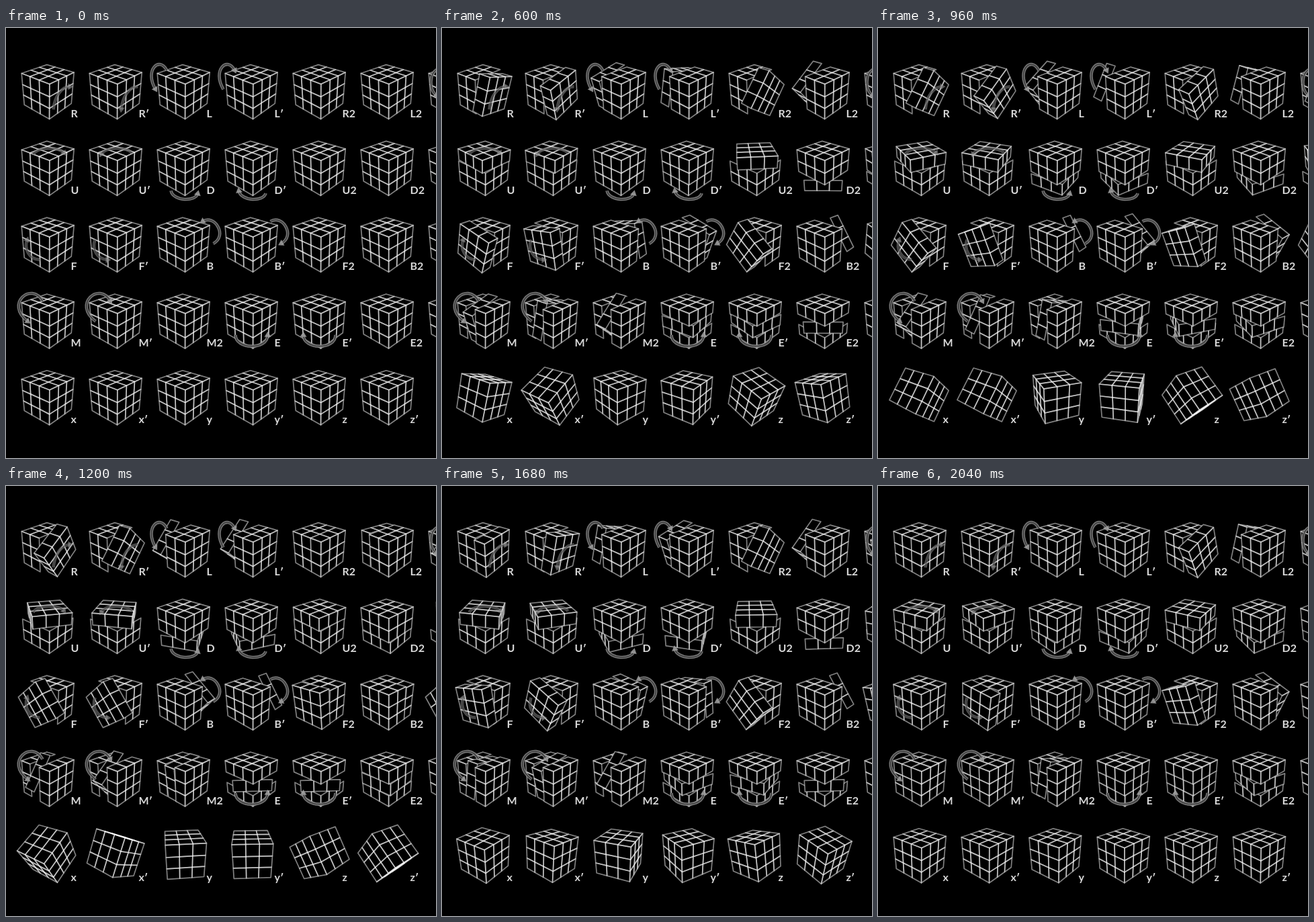
An HTML page with a canvas for the animation above (2160 ms loop, 640 px wide and 640 px high).

```html
<!DOCTYPE html>
<html lang="en">
<head>
<meta charset="utf-8">
<title>Cube notation</title>
<style>
  html, body { margin: 0; width: 100%; height: 100%; overflow: hidden; background: #000; }
  canvas { display: block; width: 640px; height: 640px; }
</style>
</head>
<body>
<canvas id="stage" width="640" height="640"></canvas>
<script>
const ctx = document.getElementById('stage').getContext('2d');
const LOOP = 2160, STEP = 120;
const YAW = 0.735, PITCH = 0.478, DISTANCE = 8.5, FOCAL = 222;
const X = 0, Y = 1, Z = 2;

// Cubic curves around the cube centre; a reversed curve points the other way.
const arcs = {
  R: [8, 30, 10, 10, 20, -4, 33, -4],
  L: [-25, -28, -36, -50, -59, -29, -42, 0],
  U: [-22, -17, -16, -29, 16, -29, 24, -19],
  D: [-19, 37, -16, 53, 18, 54, 21, 41],
  F: [-12, 26, -28, 26, -36, 10, -31, -4],
  B: [44, 2, 66, -10, 46, -42, 28, -31],
  M: [-8, -26, -24, -56, -65, -22, -30, 4],
  E: [-24, 24, -24, 46, 24, 47, 24, 24],
  r: [-26, -30, -39, -24, -39, 0, -28, 9]
};

// label, axis, first layer, end layer, signed quarter turns, start, length
const rows = [
  [['R', X, 2, 3, -1, 0, 15], ['R′', X, 2, 3, 1, 0, 17], ['L', X, 0, 1, 1, 0, 18],
   ['L′', X, 0, 1, -1, 0, 17], ['R2', X, 2, 3, -2, 0, 18], ['L2', X, 0, 1, 2, 0.6, 17.4],
   ['r', X, 1, 3, -1, 0, 17]],
  [['U', Y, 2, 3, -1, 1, 19], ['U′', Y, 2, 3, 1, 2, 18], ['D', Y, 0, 1, 1, 4, 14],
   ['D′', Y, 0, 1, -1, 3, 16], ['U2', Y, 2, 3, -2, 0, 17.3], ['D2', Y, 0, 1, 2, 0, 17.3],
   ['u', Y, 1, 3, -1, 1, 17]],
  [['F', Z, 2, 3, -1, 0, 17], ['F′', Z, 2, 3, 1, 0, 19], ['B', Z, 0, 1, 1, 0, 16],
   ['B′', Z, 0, 1, -1, 0, 16], ['F2', Z, 2, 3, -2, 0.6, 17.6], ['B2', Z, 0, 1, 2, 0.4, 17.6],
   ['f', Z, 1, 3, -1, 0, 17]],
  [['M', X, 1, 2, 1, 0, 16], ['M′', X, 1, 2, -1, 0, 16], ['M2', X, 1, 2, 2, 0, 17.3],
   ['E', Y, 1, 2, 1, 1, 16], ['E′', Y, 1, 2, -1, 1, 16], ['E2', Y, 1, 2, 2, 0, 17.3],
   ['S', Z, 1, 2, -1, 0, 16]],
  [['x', X, 0, 3, -1, 0, 15], ['x′', X, 0, 3, 1, -2, 17], ['y', Y, 0, 3, -1, 1, 17],
   ['y′', Y, 0, 3, 1, 1, 16], ['z', Z, 0, 3, -1, -1, 17], ['z′', Z, 0, 3, 1, 0, 17]]
];

const smooth = u => u * u * (3 - 2 * u);
const grid = i => i * 2 / 3 - 1;

function turnAngle([, , , , quarters, start, length], step) {
  if (step === 0) return 0;
  const u = Math.min(1, Math.max(0, (step - start) / length));
  const progress = Math.abs(quarters) === 2 ? u : smooth(u);
  return quarters * progress * Math.PI / 2;
}

function rotate(p, axis, angle) {
  const q = [...p], b = (axis + 1) % 3, c = (axis + 2) % 3;
  const cos = Math.cos(angle), sin = Math.sin(angle);
  q[b] = p[b] * cos - p[c] * sin;
  q[c] = p[b] * sin + p[c] * cos;
  return q;
}

function project([x, y, z]) {
  const side = x * Math.cos(YAW) - z * Math.sin(YAW);
  const front = x * Math.sin(YAW) + z * Math.cos(YAW);
  const up = y * Math.cos(PITCH) - front * Math.sin(PITCH);
  const depth = front * Math.cos(PITCH) + y * Math.sin(PITCH);
  const scale = FOCAL / (DISTANCE - depth);
  return [side * scale, -up * scale];
}

const facesViewer = points => points.reduce((area, [x, y], i) => {
  const [nx, ny] = points[(i + 1) % points.length];
  return area + x * ny - nx * y;
}, 0) < 0;

function trace(points) {
  ctx.beginPath();
  points.forEach(p => ctx.lineTo(...p));
  ctx.closePath();
}

// Draws layers from..to along an axis; shared cell borders are stroked twice.
function drawSlab(axis, from, to, angle) {
  const low = [0, 0, 0], high = [3, 3, 3];
  low[axis] = from;
  high[axis] = to;
  const cells = [];
  for (let a = 0; a < 3; a++) {
    const b = (a + 1) % 3, c = (a + 2) % 3;
    for (const level of [low[a], high[a]]) {
      const quad = (b0, b1, c0, c1) => {
        const corners = [[b0, c0], [b1, c0], [b1, c1], [b0, c1]].map(([i, j]) => {
          const p = [];
          p[a] = grid(level);
          p[b] = grid(i);
          p[c] = grid(j);
          return project(rotate(p, axis, angle));
        });
        return level === low[a] ? corners.reverse() : corners;
      };
      const face = quad(low[b], high[b], low[c], high[c]);
      if (!facesViewer(face)) continue;
      trace(face);
      ctx.fill();
      if (level % 3) continue;
      for (let i = low[b]; i < high[b]; i++)
        for (let j = low[c]; j < high[c]; j++) cells.push(quad(i, i + 1, j, j + 1));
    }
  }
  for (const cell of cells) {
    trace(cell);
    ctx.stroke();
  }
}

function drawCube([, axis, from, to], angle) {
  ctx.fillStyle = '#000';
  ctx.strokeStyle = 'rgba(255,255,255,.5)';
  ctx.lineWidth = 1.7;
  ctx.lineJoin = 'round';
  if (!angle) return drawSlab(axis, 0, 3, 0);
  if (from > 0) drawSlab(axis, 0, from, 0);
  drawSlab(axis, from, to, angle);
  if (to < 3) drawSlab(axis, to, 3, 0);
}

function drawArrow(label) {
  const arc = arcs[label[0]];
  if (!arc || label.endsWith('2')) return;
  let points = [0, 2, 4, 6].map(i => [arc[i], arc[i + 1]]);
  if (label.endsWith('′')) points.reverse();
  const [start, c1, c2, end] = points;
  const onFace = 'RUF'.includes(label[0]);
  ctx.save();
  ctx.globalAlpha = onFace ? 0.55 : 0.85;
  for (const [width, color] of [[4.6, '#8c8c8c'], [1.8, '#383838']]) {
    ctx.beginPath();
    ctx.moveTo(...start);
    ctx.bezierCurveTo(...c1, ...c2, ...end);
    ctx.lineWidth = width;
    ctx.strokeStyle = color;
    ctx.stroke();
  }
  ctx.translate(...end);
  ctx.rotate(Math.atan2(end[1] - c2[1], end[0] - c2[0]));
  ctx.fillStyle = '#a0a0a0';
  trace([[-3, -5], [5, 0], [-3, 5]]);
  ctx.fill();
  ctx.restore();
}

function drawStage(step) {
  ctx.fillStyle = '#000';
  ctx.fillRect(0, 0, 640, 640);
  ctx.font = '700 16px Lato, "Open Sans", sans-serif';
  rows.forEach((row, r) => row.forEach((move, c) => {
    ctx.save();
    ctx.translate(62.5 + 101 * c, 91.3 + 113.8 * r);
    drawCube(move, turnAngle(move, step));
    drawArrow(move[0]);
    ctx.fillStyle = '#d8d8d8';
    ctx.fillText(move[0], 34, 41.5);
    ctx.restore();
  }));
}

let shown = -1;
function tick() {
  const step = Math.max(0, Math.floor(performance.now() % LOOP / STEP) - 1);
  if (step !== shown) drawStage(shown = step);
  requestAnimationFrame(tick);
}
tick();
</script>
</body>
</html>
```
